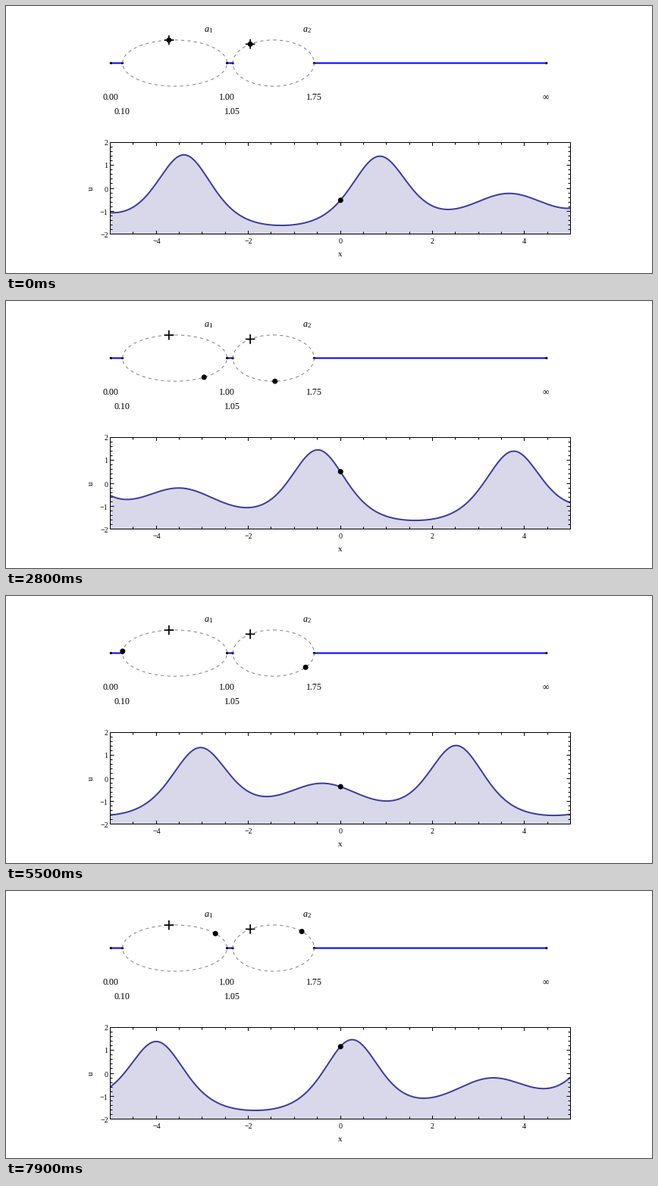
Recreate the animation shown at these times as a matplotlib script. Size 852 px wide and 353 px high, loop 8 s.

```python
"""Two-gap KdV solution: Dirichlet eigenvalues circling their gaps, and u(x, t)."""
import numpy as np
import matplotlib.pyplot as plt
from matplotlib.animation import FuncAnimation
from matplotlib.patches import Circle, Ellipse, Polygon, Rectangle

W, H, DPI = 852, 353, 72
FRAMES, INTERVAL, DT = 80, 100, 0.025

EDGES = np.array([0, 0.10, 1.00, 1.05, 1.75])
MID = np.array([0.55, 1.40])
HALF = np.array([0.45, 0.35])
START = np.array([0.5, 1.2])
INF = 3.75

plt.rcParams["font.family"] = "Liberation Serif"
plt.rcParams["path.snap"] = False


# --- Dubrovin flow; the angles run clockwise around each gap ---
def mu(phi):
    return MID + HALF * np.cos(phi)


def x_flow(phi):
    m = mu(phi)
    m1, m2 = m[..., 0], m[..., 1]
    g1 = m1 * (1.05 - m1) * (1.75 - m1)
    g2 = m2 * (m2 - 0.1) * (m2 - 1)
    return -2 * np.sqrt(np.stack([g1, g2], -1)) / (m2 - m1)[..., None]


def t_flow(phi):
    return (2 * EDGES.sum() - 4 * mu(phi)[..., ::-1]) * x_flow(phi)


def rk4(f, y, h):
    a = f(y)
    b = f(y + h / 2 * a)
    c = f(y + h / 2 * b)
    d = f(y + h * c)
    return y + h / 6 * (a + 2 * b + 2 * c + d)


def path(f, y, h, steps):
    out = [y]
    for _ in range(steps):
        out.append(rk4(f, out[-1], h))
    return np.array(out)


def height(phi):
    return 2 * mu(phi).sum(-1) - EDGES.sum()


SUB, NX = 5, 200
phases = path(t_flow, np.arccos((START - MID) / HALF), DT / SUB,
              SUB * (FRAMES - 1))[::SUB]
right = path(x_flow, phases, 5 / NX, NX)
left = path(x_flow, phases, -5 / NX, NX)
waves = height(np.concatenate([left[:0:-1], right])).T
xs = np.linspace(-5, 5, 2 * NX + 1)

# --- stage in pixel coordinates ---
fig = plt.figure(figsize=(W / DPI, H / DPI), dpi=DPI, facecolor="white")
ax = fig.add_axes([0, 0, 1, 1])
ax.set(xlim=(0, W), ylim=(H, 0))
ax.axis("off")

BASE, UNIT, RY = 75.5, 153.2, 30.6
L, R, T, B = 137.5, 744.5, 180.5, 301.5
DROP = 0.7  # the curve sits slightly below the pixel-aligned frame
INK = "#3f3d99"


def spec_x(e):
    return 138.3 + UNIT * e


def plot_x(x):
    return L + (x + 5) * (R - L) / 10


def plot_y(u):
    return B - (u + 2) * (B - T) / 4


def gap_xy(phi):
    return spec_x(mu(phi)), BASE - RY * np.sin(phi)


def crisp(v):
    return np.floor(v) + 0.5


def text(x, y, s, size=12, ha="center", **kw):
    ax.text(x, y, s, fontsize=size, ha=ha, va="baseline", **kw)


def line(x, y, color="black", lw=1.0, **kw):
    return ax.plot(x, y, color=color, lw=lw, solid_capstyle="butt", **kw)[0]


def disc(x, y, r, z):
    return ax.add_patch(Circle((x, y), r, fc="black", lw=0, zorder=z))


# spectrum
for a, b in [(0, 0.10), (1.00, 1.05), (1.75, INF)]:
    line(spec_x(np.array([a, b])), [BASE, BASE], "#0000ff", 2, zorder=2)
for e in [*EDGES, INF]:
    disc(spec_x(e), BASE, 1.6, 3)
for c, h in zip(MID, HALF):
    ax.add_patch(Ellipse((spec_x(c), BASE), 2 * h * UNIT, 2 * RY, fill=False,
                         ec="#808080", lw=1, ls=(0, (4.2, 4.2)), zorder=4))
for px, py in zip(*gap_xy(phases[0])):
    line([px - 6.3, px + 6.3], [py, py], lw=1.7, zorder=5)
    line([px, px], [py - 6.3, py + 6.3], lw=1.7, zorder=5)

for e, y in [(0, 124.3), (0.10, 143.3), (1.00, 124.3), (1.05, 143.3), (1.75, 124.3)]:
    text(spec_x(e) - 0.3, y, f"{e:.2f}")
text(spec_x(INF) - 0.5, 124.3, "\u221e")
for x, s in [(262, "1"), (392, "2")]:
    text(x, 33.6, "a", ha="left", style="italic")
    text(x + 5.6, 35.4, s, 9, ha="left")

# plot frame, ticks and labels
fill = ax.add_patch(Polygon([(L, B), (R, B)], closed=True, fc=INK, alpha=0.2,
                            lw=0, zorder=1))
curve = line([], [], INK, 2, zorder=2)
clip = Rectangle((L, T), R - L, B - T, transform=ax.transData)
curve.set_clip_path(clip)
ax.add_patch(Rectangle((L, T), R - L, B - T, fill=False, ec="black", lw=1, zorder=6))

for i in range(-9, 10):
    px, n = crisp(plot_x(i / 2)), 4.5 if i % 4 == 0 else 3
    line([px, px], [T, T + n], zorder=6)
    line([px, px], [B, B - n], zorder=6)
    if i % 4 == 0:
        text(px, 313.8, f"{i // 2}".replace("-", "\u2212"), 10)
for i in range(-10, 11):
    py, n = crisp(plot_y(i / 5)), 5 if i % 5 == 0 else 3
    line([L, L + n], [py, py], zorder=6)
    line([R, R - n], [py, py], zorder=6)
    if i % 5 == 0:
        text(134.6, py + 4, f"{i // 5}".replace("-", "\u2212"), 10, ha="right")
text(440.5, 331, "x", 11)
ax.text(112.3, 241, "u", fontsize=11, rotation=90, ha="center", va="center")

dots = [disc(0, 0, 3.5, 7) for _ in range(3)]


def update(n):
    px, py = plot_x(xs), plot_y(waves[n]) + DROP
    curve.set_data(px, py)
    fill.set_xy(np.column_stack([np.r_[L, px, R], np.r_[B, py, B]]))
    centers = [*zip(*gap_xy(phases[n])), (plot_x(0) + 0.3, py[NX])]
    for dot, center in zip(dots, centers):
        dot.set_center(center)
    return curve, fill, *dots


anim = FuncAnimation(fig, update, frames=FRAMES, interval=INTERVAL,
                     repeat=True, repeat_delay=0, blit=False)
plt.show()
```
